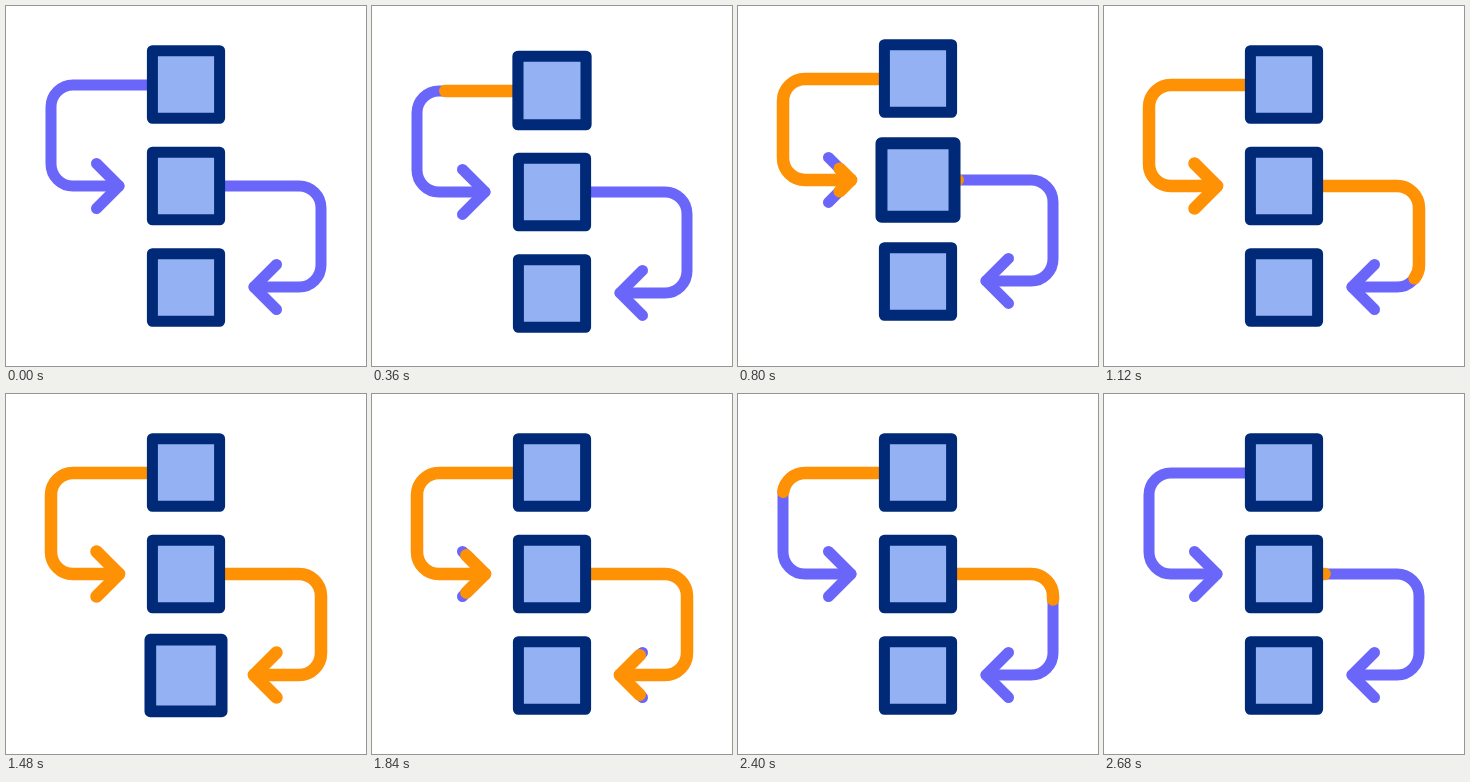
Write an HTML page with a canvas that moves like this. It is 360 by 360 pixels and loops after 3000 ms.

```html
<!DOCTYPE html>
<html lang="en">
<head>
<meta charset="utf-8">
<style>
  html, body { margin: 0; width: 100%; height: 100%; overflow: hidden; background: #fff; }
  canvas { display: block; width: 100vmin; height: 100vmin; }
</style>
</head>
<body>
<canvas></canvas>
<script>
const SIZE = 360, LOOP = 3000;
const NAVY = '#002a77', BLUE = '#94b1f3', PURPLE = '#6a66fa', ORANGE = '#ff9104';
const canvas = document.querySelector('canvas');
const ctx = canvas.getContext('2d');

const ramp = (t, start, end) => Math.min(1, Math.max(0, (t - start) / (end - start)));
const ease = u => (1 - Math.cos(Math.PI * u)) / 2;
const hump = (t, start, end) => Math.sin(Math.PI * ramp(t, start, end)) ** 2;

// Vertical sway of the whole diagram: down, up, back to rest.
const sway = t =>
  11 * ease(ramp(t, 150, 550)) - 18 * ease(ramp(t, 550, 845)) + 7 * ease(ramp(t, 845, 1050));

const boxes = [
  { y: 78.5, pulse: [100, 400] },
  { y: 180, pulse: [655, 945] },
  { y: 281.5, pulse: [1395, 1665] }
];

// dir is the side on which the arrow leaves its box.
const arrows = [
  { dir: -1, y: 79, tip: 113, fill: 240, clear: 1800, wipe: [2040, 2670] },
  { dir: 1, y: 180, tip: 248, fill: 800, clear: 1810, wipe: [2060, 2685] }
];

function shaftPath({ dir, y, tip }) {
  const r = 22, side = 180 + dir * 135, bottom = y + 101;
  const path = new Path2D();
  path.moveTo(180 + dir * 39, y);
  path.arcTo(side, y, side, bottom, r);
  path.arcTo(side, bottom, tip, bottom, r);
  path.lineTo(tip, bottom);
  return path;
}

function headPath({ dir, y, tip }) {
  const path = new Path2D();
  for (const s of [-1, 1]) {
    path.moveTo(tip, y + 101);
    path.lineTo(tip + dir * 22.5, y + 101 + s * 22.5);
  }
  return path;
}

for (const arrow of arrows) {
  arrow.shaft = shaftPath(arrow);
  arrow.head = headPath(arrow);
}
const SHAFT_LENGTH = 74 + 57 + 46 + 22 * Math.PI;
const HEAD_LENGTH = 22.5 * Math.SQRT2;

function strokePart(path, length, amount) {
  if (amount <= 0) return;
  ctx.setLineDash(amount < 1 ? [length * amount, 999] : []);
  ctx.stroke(path);
  ctx.setLineDash([]);
}

function drawArrow(arrow, t) {
  const { fill, clear, wipe, shaft, head } = arrow;
  ctx.strokeStyle = PURPLE;
  ctx.lineWidth = 11;
  ctx.stroke(shaft);
  ctx.stroke(head);

  ctx.strokeStyle = ORANGE;
  ctx.lineWidth = 12.5;
  strokePart(shaft, SHAFT_LENGTH, ramp(t, fill, fill + 440) - ramp(t, ...wipe));
  strokePart(head, HEAD_LENGTH, ramp(t, fill + 440, fill + 680) - ramp(t, clear, wipe[0]));
}

function drawBox({ y, pulse }, t) {
  const scale = 1 + 0.087 * hump(t, ...pulse);
  ctx.save();
  ctx.translate(180, y);
  ctx.scale(scale, scale);
  ctx.lineWidth = 11;
  ctx.fillStyle = BLUE;
  ctx.strokeStyle = NAVY;
  ctx.beginPath();
  ctx.rect(-33.6, -33.8, 67.2, 67.6);
  ctx.fill();
  ctx.stroke();
  ctx.restore();
}

function draw(t) {
  const pixels = Math.round(Math.min(innerWidth, innerHeight) * devicePixelRatio) || SIZE;
  if (canvas.width !== pixels) canvas.width = canvas.height = pixels;
  const k = pixels / SIZE;
  ctx.setTransform(k, 0, 0, k, 0, 0);
  ctx.fillStyle = '#fff';
  ctx.fillRect(0, 0, SIZE, SIZE);
  ctx.lineCap = ctx.lineJoin = 'round';
  ctx.translate(0, sway(t));
  arrows.forEach(arrow => drawArrow(arrow, t));
  boxes.forEach(box => drawBox(box, t));
}

function tick() {
  draw(performance.now() % LOOP);
  requestAnimationFrame(tick);
}
tick();
</script>
</body>
</html>
```
